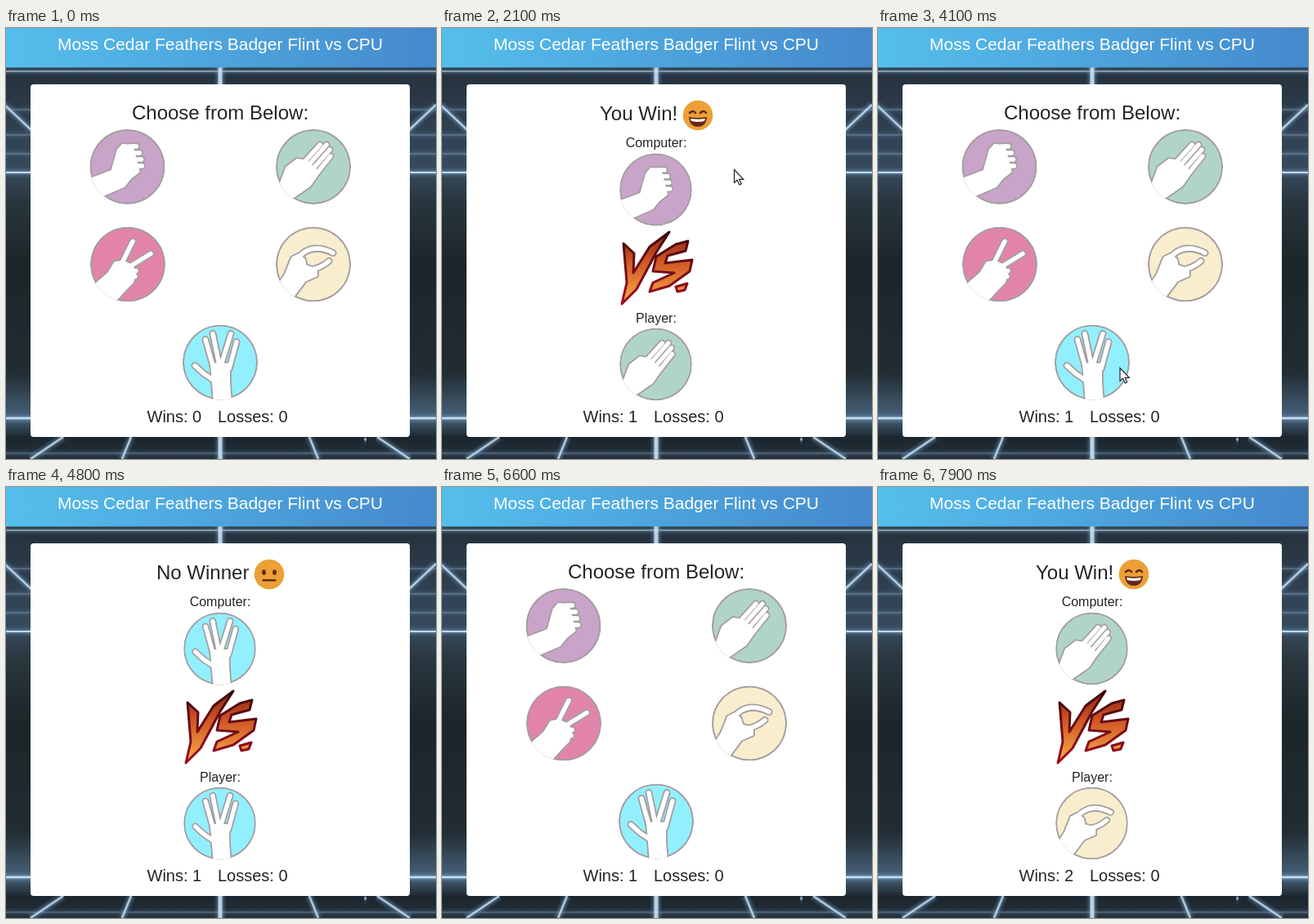
Animation of 526 by 528 pixels, one loop 8 s. Source, as an HTML page:

```html
<!DOCTYPE html>
<html lang="en">
<head>
<meta charset="utf-8">
<title>Hand game</title>
<style>
  html, body { margin: 0; width: 100%; height: 100%; overflow: hidden; background: #1d262b; }
  svg { display: block; font-family: "Liberation Sans", Arial, sans-serif; }
  .hand { stroke-linejoin: round; stroke-linecap: round; }
  .text { fill: #212529; }
</style>
</head>
<body>
<svg width="526" height="528" viewBox="0 0 526 528">
  <defs>
    <linearGradient id="room" x1="0" y1="0" x2="0" y2="528" gradientUnits="userSpaceOnUse">
      <stop offset=".1" stop-color="#25313d"/>
      <stop offset=".33" stop-color="#374b5d"/>
      <stop offset=".4" stop-color="#29363f"/>
      <stop offset=".55" stop-color="#1c2529"/>
      <stop offset=".8" stop-color="#212c33"/>
      <stop offset=".905" stop-color="#48637a"/>
      <stop offset=".95" stop-color="#1c262e"/>
      <stop offset="1" stop-color="#24303a"/>
    </linearGradient>
    <linearGradient id="bar">
      <stop offset="0" stop-color="#55bfec"/>
      <stop offset="1" stop-color="#4589cd"/>
    </linearGradient>
    <linearGradient id="fire" x1="0" y1="250" x2="0" y2="338" gradientUnits="userSpaceOnUse">
      <stop offset="0" stop-color="#8d2113"/>
      <stop offset=".4" stop-color="#cf5423"/>
      <stop offset="1" stop-color="#f9b04a"/>
    </linearGradient>
    <linearGradient id="rim" x1="0" y1="250" x2="0" y2="338" gradientUnits="userSpaceOnUse">
      <stop offset="0" stop-color="#380b0d"/>
      <stop offset="1" stop-color="#a50d22"/>
    </linearGradient>
    <clipPath id="disc"><circle r="46"/></clipPath>
  </defs>

  <rect width="526" height="528" fill="url(#room)"/>
  <g id="grid" fill="none"></g>
  <rect width="526" height="48.5" fill="url(#bar)"/>
  <text x="262" y="27" font-size="21" fill="#fff" text-anchor="middle">Moss Cedar Feathers Badger Flint vs CPU</text>
  <rect x="30" y="69" width="464" height="432" rx="4" fill="#fff"/>

  <g id="menu">
    <text class="text" x="262" y="112" font-size="24" text-anchor="middle">Choose from Below:</text>
    <g id="choices"></g>
  </g>

  <g id="result">
    <text id="verdict" class="text" y="113" font-size="24"></text>
    <g id="face">
      <circle r="18.3" fill="#eca036"/>
      <g id="happy" fill="#65291c">
        <path d="M-10-3q4-4 7 0M3-3q4-4 7 0" fill="none" stroke="#65291c" stroke-width="2.6" stroke-linecap="round"/>
        <path d="M-11 2Q0 4 11 2Q10 14 0 14T-11 2"/>
        <path d="M-9 4Q0 5.500 9 4L8 7Q0 9-8 7Z" fill="#fff"/>
      </g>
      <g id="neutral" fill="#65291c">
        <ellipse cx="-6.5" cy="-2.5" rx="2.4" ry="3.3"/>
        <ellipse cx="6.5" cy="-2.5" rx="2.4" ry="3.3"/>
        <rect x="-8.5" y="6" width="17" height="2.6" rx="1.3"/>
      </g>
    </g>
    <g class="text" font-size="16" text-anchor="middle">
      <text x="262" y="146">Computer:</text>
      <text x="262" y="361">Player:</text>
    </g>
    <g fill="url(#fire)" stroke="url(#rim)" stroke-width="3" stroke-linejoin="round">
      <path d="M222 264L235 276 234 300 254 268 278 250 262 275 238 320 220 338 226 312Z"/>
      <path d="M301 261L298 273 276 279 273 288 306 284 303 298 278 316 254 323 258 312 284 300 258 298 262 280 286 265Z"/>
      <path d="M286 317L300 313 297 321 288 323Z"/>
    </g>
    <g id="cpu" transform="translate(261.5 198) scale(.965)"></g>
    <g id="player" transform="translate(261.5 412) scale(.965)"></g>
  </g>

  <g class="text" font-size="20">
    <text id="wins" x="172.5" y="483"></text>
    <text x="259" y="483">Losses: 0</text>
  </g>
  <path id="cursor" d="M0 0V16L3.600 12.700 6.200 18.500 8.700 17.400 6.200 11.800H11.300Z" fill="#fff" stroke="#23232b" stroke-width="1.2"/>
</svg>

<script>
const LOOP = 8000, STEP = 100, MID = 262;
const $ = id => document.getElementById(id);
const show = (id, on) => $(id).setAttribute('visibility', on ? 'inherit' : 'hidden');

// Hands around the disc centre: a filled palm with the forearm, and fingers as round strokes
const hands = {
  fist: {
    at: [148.5, 170], color: '#c9a4c9',
    palm: 'M-54 18L-19 5-12-20-6-27 6-26 14 6 4 14-4 24-50 44Z',
    fingers: 'M3-25H11M5-17H15M6-9H17M8-1H18'
  },
  flat: {
    at: [376, 170], color: '#b0d5c8',
    palm: 'M-46 36L-33 1-20-9-8-7 7 7-4 23-24 37-40 48Z',
    fingers: 'M-10-7L8-27M-5-3L16-27M0 2L20-21M5 7L21-13'
  },
  vee: {
    at: [149, 289.5], color: '#e284aa',
    palm: 'M-48 32L-24 11-16-2-6-4 6 2 9 12 6 22-3 31-20 50Z',
    fingers: 'M-9 2L6-28M2 3L28-13M4 9L10 8M4 15L9 15'
  },
  pinch: {
    at: [376, 289.5], color: '#f8edcd',
    palm: 'M-50 36L-34 12-26-8-18-12-11-6-9 2 4 6 4 14-10 20-22 36-34 52Z',
    fingers: 'M-20-6Q-4-28 24-14M-8 7Q8 6 19-4'
  },
  split: {
    at: [262, 409.5], color: '#92effe',
    palm: 'M-11 2L11 2 11 24 13 50H-7L-9 26Z',
    fingers: 'M-8 22L-20 14-31 4M-8 8L-18-28M-1 4L-9-35M1 4L13-35M11 8L20-25'
  }
};

function icon({ color, palm, fingers }) {
  const layer = (paint, grow) =>
    `<path d="${palm}" fill="${paint}" stroke="${paint}" stroke-width="${2 + grow}"/>` +
    `<path d="${fingers}" fill="none" stroke="${paint}" stroke-width="${5.4 + grow}"/>`;
  return `<g class="hand" clip-path="url(#disc)"><circle r="45" fill="${color}" stroke="#a39da0" stroke-width="2"/>` +
    layer('#a39da0', 3.6) + layer('#fff', 0) + '</g>';
}

$('choices').innerHTML = Object.values(hands)
  .map(hand => `<g transform="translate(${hand.at})">${icon(hand)}</g>`).join('');

// A glowing line: wide faint strokes under a bright core
const glow = (d, width, strength) => [[9, '#5c86ad', .22], [4, '#7ba8d0', .35], [0, '#d3e5f4', 1]]
  .map(([grow, color, alpha]) =>
    `<path d="${d}" stroke="${color}" stroke-width="${width + grow}" opacity="${alpha * strength}"/>`).join('');
const level = (y, width, strength) => glow(`M0 ${y}H526`, width, strength);
const pair = (x1, y1, x2, y2) =>
  glow(`M${x1} ${y1}L${x2} ${y2}M${2 * MID - x1} ${y1}L${2 * MID - x2} ${y2}`, 2.5, .8);

$('grid').innerHTML = [100, 131, 154, 521].map(y => level(y, 1.2, .35)).join('') +
  level(53, 2, .5) + level(177, 2, .9) + level(478, 2.5, .95) +
  pair(-2, 94, 32, 126) + pair(70, 501, 30, 528) + pair(153, 501, 142, 528) +
  glow(`M${MID} 48V70M${MID} 500V528`, 5, .85) + glow('M438 504h3', 3, .6);

const rounds = [
  { from: 1300, to: 3300, cpu: 'fist', player: 'flat', won: true },
  { from: 4600, to: 6600, cpu: 'split', player: 'split', won: false },
  { from: 7700, to: LOOP, cpu: 'flat', player: 'pinch', won: true }
];

// Pointer trips: moving from start to end, then resting until hide
const trips = [
  { start: 300, end: 1000, hide: 3100, a: [466, 238], b: [357.5, 173.5] },
  { start: 3100, end: 4000, hide: 4600, a: [357.5, 173.5], b: [296, 416.5] },
  { start: 7200, end: 7500, hide: 7700, a: [479, 319], b: [381, 271.5] }
];

let shown;

function showRound(round) {
  if (round === shown) return;
  shown = round;
  show('menu', !round);
  show('result', round);
  show('happy', round && round.won);
  show('neutral', round && !round.won);
  if (!round) return;
  $('verdict').textContent = round.won ? 'You Win!' : 'No Winner';
  $('verdict').setAttribute('x', round.won ? 193 : 184);
  $('face').setAttribute('transform', `translate(${round.won ? 313 : 322} 107)`);
  $('cpu').innerHTML = icon(hands[round.cpu]);
  $('player').innerHTML = icon(hands[round.player]);
}

function draw(now) {
  const t = Math.floor(now % LOOP / STEP) * STEP;
  showRound(rounds.find(r => t >= r.from && t < r.to) || null);
  $('wins').textContent = 'Wins: ' + rounds.filter(r => r.won && t >= r.from).length;

  const trip = trips.find(m => t >= m.start && t < m.hide);
  show('cursor', trip);
  if (!trip) return;
  const k = Math.min(1, (t - trip.start) / (trip.end - trip.start));
  const ease = k * (2 - k);
  const spot = trip.a.map((v, i) => v + (trip.b[i] - v) * ease);
  $('cursor').setAttribute('transform', `translate(${spot})`);
}

const begin = performance.now();
function tick() {
  draw(performance.now() - begin);
  requestAnimationFrame(tick);
}
tick();
</script>
</body>
</html>
```
